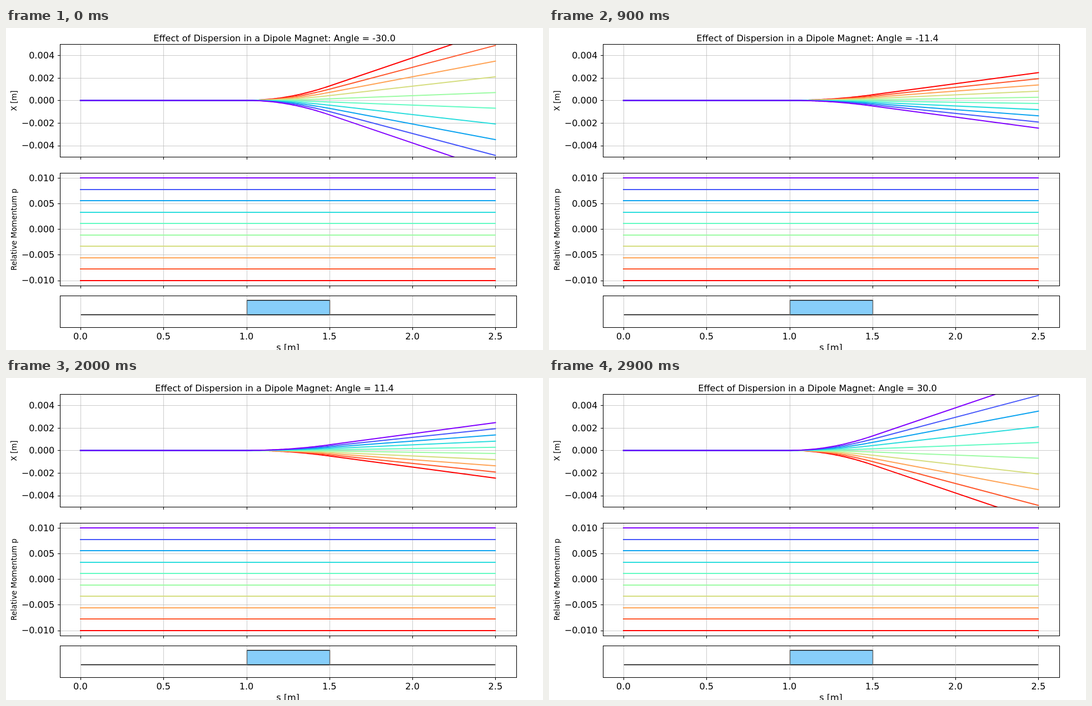
Recreate the animation shown at these times as an HTML page with a canvas. Size 966 by 580 pixels, loop 3000 ms.

```html
<!DOCTYPE html>
<html lang="en">
<head>
<meta charset="utf-8">
<title>Dispersion in a dipole</title>
<style>
  html, body { margin: 0; width: 966px; height: 580px; overflow: hidden; background: #fff; }
  canvas { display: block; }
</style>
</head>
<body>
<canvas id="stage" width="966" height="580"></canvas>
<script>
const ctx = document.getElementById('stage').getContext('2d');

const STEPS = 30, STEP_MS = 100, MAX_ANGLE = 30;
const MAGNET_START = 1, MAGNET_LENGTH = 0.5, END = 2.5;
const BEAMS = 10, MAX_P = 0.01;
const LEFT = 97, RIGHT = 918;
const GRID = 'rgba(176, 176, 176, 0.65)';

const orbit = { top: 29, bottom: 232, y: v => 130.4 - v * 20280 };
const momentum = { top: 261, bottom: 464, y: v => 362.4 - v * 9218 };
const lattice = { top: 482, bottom: 539 };

const xOf = s => 133.9 + s * 298.6;
const crisp = v => Math.floor(v + 0.5) + 0.5;
const sTicks = [0, 0.5, 1, 1.5, 2, 2.5];
const orbitTicks = [0.004, 0.002, 0, -0.002, -0.004];
const momentumTicks = [0.01, 0.005, 0, -0.005, -0.01];

// Beams run from the lowest momentum (red) to the highest (violet).
const beams = Array.from({ length: BEAMS }, (_, i) => {
  const k = 1 - i / (BEAMS - 1);
  const rgb = [Math.min(1, Math.abs(2 * k - 0.5)), Math.sin(Math.PI * k), Math.cos(Math.PI * k / 2)];
  return {
    p: MAX_P * (1 - 2 * k),
    color: `rgb(${rgb.map(c => Math.round(c * 255)).join(',')})`
  };
});

function line(x1, y1, x2, y2, color, width = 1) {
  ctx.strokeStyle = color;
  ctx.lineWidth = width;
  ctx.beginPath();
  ctx.moveTo(x1, y1);
  ctx.lineTo(x2, y2);
  ctx.stroke();
}

function text(str, x, y, align = 'center', size = 16.1) {
  ctx.font = `${size}px "DejaVu Sans", sans-serif`;
  ctx.textAlign = align;
  ctx.fillStyle = '#000';
  ctx.fillText(str, x, y);
}

function sideLabel(str, y) {
  ctx.save();
  ctx.translate(19, y);
  ctx.rotate(-Math.PI / 2);
  text(str, 0, 0, 'center', 13.42);
  ctx.restore();
}

function verticalGrid({ top, bottom }) {
  for (const s of sTicks) line(crisp(xOf(s)), top, crisp(xOf(s)), bottom + 1, GRID);
}

function horizontalGrid(panel, ticks) {
  for (const v of ticks) line(LEFT, crisp(panel.y(v)), RIGHT + 1, crisp(panel.y(v)), GRID);
}

function frame({ top, bottom }) {
  ctx.strokeStyle = '#000';
  ctx.lineWidth = 1.07;
  ctx.strokeRect(LEFT + 0.5, top + 0.5, RIGHT - LEFT, bottom - top);
  for (const s of sTicks) line(crisp(xOf(s)), bottom + 1, crisp(xOf(s)), bottom + 5, '#000', 1.07);
}

function valueTicks(panel, ticks) {
  for (const v of ticks) {
    const y = panel.y(v);
    line(LEFT - 4, crisp(y), LEFT, crisp(y), '#000', 1.07);
    text(v.toFixed(3).replace('-', '\u2212'), 87.2, Math.round(y + 5.9), 'right');
  }
}

// Offset per unit momentum error: an arc in the magnet, then a straight drift.
function dispersion(s, angle) {
  const inside = Math.min(Math.max(s - MAGNET_START, 0), MAGNET_LENGTH);
  const drift = Math.max(s - MAGNET_START - MAGNET_LENGTH, 0);
  const radius = MAGNET_LENGTH / angle;
  return radius * (1 - Math.cos(inside / radius)) + drift * Math.sin(angle);
}

function drawOrbits(angle) {
  ctx.save();
  ctx.beginPath();
  ctx.rect(LEFT, orbit.top, RIGHT - LEFT + 1, orbit.bottom - orbit.top + 1);
  ctx.clip();
  ctx.lineCap = 'square';
  ctx.lineJoin = 'round';
  ctx.lineWidth = 2.01;
  for (const { p, color } of beams) {
    ctx.strokeStyle = color;
    ctx.beginPath();
    ctx.moveTo(xOf(0), orbit.y(0));
    for (let i = 0; i <= 50; i++) {
      const s = MAGNET_START + MAGNET_LENGTH * i / 50;
      ctx.lineTo(xOf(s), orbit.y(p * dispersion(s, angle)));
    }
    ctx.lineTo(xOf(END), orbit.y(p * dispersion(END, angle)));
    ctx.stroke();
  }
  ctx.restore();
}

function drawMomenta() {
  for (const { p, color } of beams) {
    const y = Math.round(momentum.y(p));
    line(133, y, 881, y, color, 2);
  }
}

function drawLattice() {
  const x1 = crisp(xOf(MAGNET_START)), x2 = crisp(xOf(MAGNET_START + MAGNET_LENGTH));
  line(134.5, 516.5, 880.5, 516.5, '#000', 1.34);
  ctx.fillStyle = '#87cefa';
  ctx.fillRect(x1, 490.5, x2 - x1, 26);
  ctx.lineWidth = 1.34;
  ctx.strokeRect(x1, 490.5, x2 - x1, 26);
}

function draw(now) {
  const step = Math.floor(now / STEP_MS) % STEPS;
  const degrees = -MAX_ANGLE + 2 * MAX_ANGLE * step / (STEPS - 1);

  ctx.fillStyle = '#fff';
  ctx.fillRect(0, 0, 966, 580);

  verticalGrid(orbit);
  horizontalGrid(orbit, orbitTicks);
  drawOrbits(degrees * Math.PI / 180);
  frame(orbit);
  valueTicks(orbit, orbitTicks);
  sideLabel('X [m]', 131);

  verticalGrid(momentum);
  horizontalGrid(momentum, momentumTicks);
  drawMomenta();
  frame(momentum);
  valueTicks(momentum, momentumTicks);
  sideLabel('Relative Momentum p', 363);

  drawLattice();
  verticalGrid(lattice);
  frame(lattice);
  for (const s of sTicks) text(s.toFixed(1), xOf(s), 561);
  text('s [m]', 507, 581);

  text(`Effect of Dispersion in a Dipole Magnet: Angle = ${degrees.toFixed(1)}`, 483, 24);
}

let start;
function tick(now) {
  start ??= now;
  draw(Math.max(0, now - start));
  requestAnimationFrame(tick);
}
draw(0);
requestAnimationFrame(tick);
</script>
</body>
</html>
```
